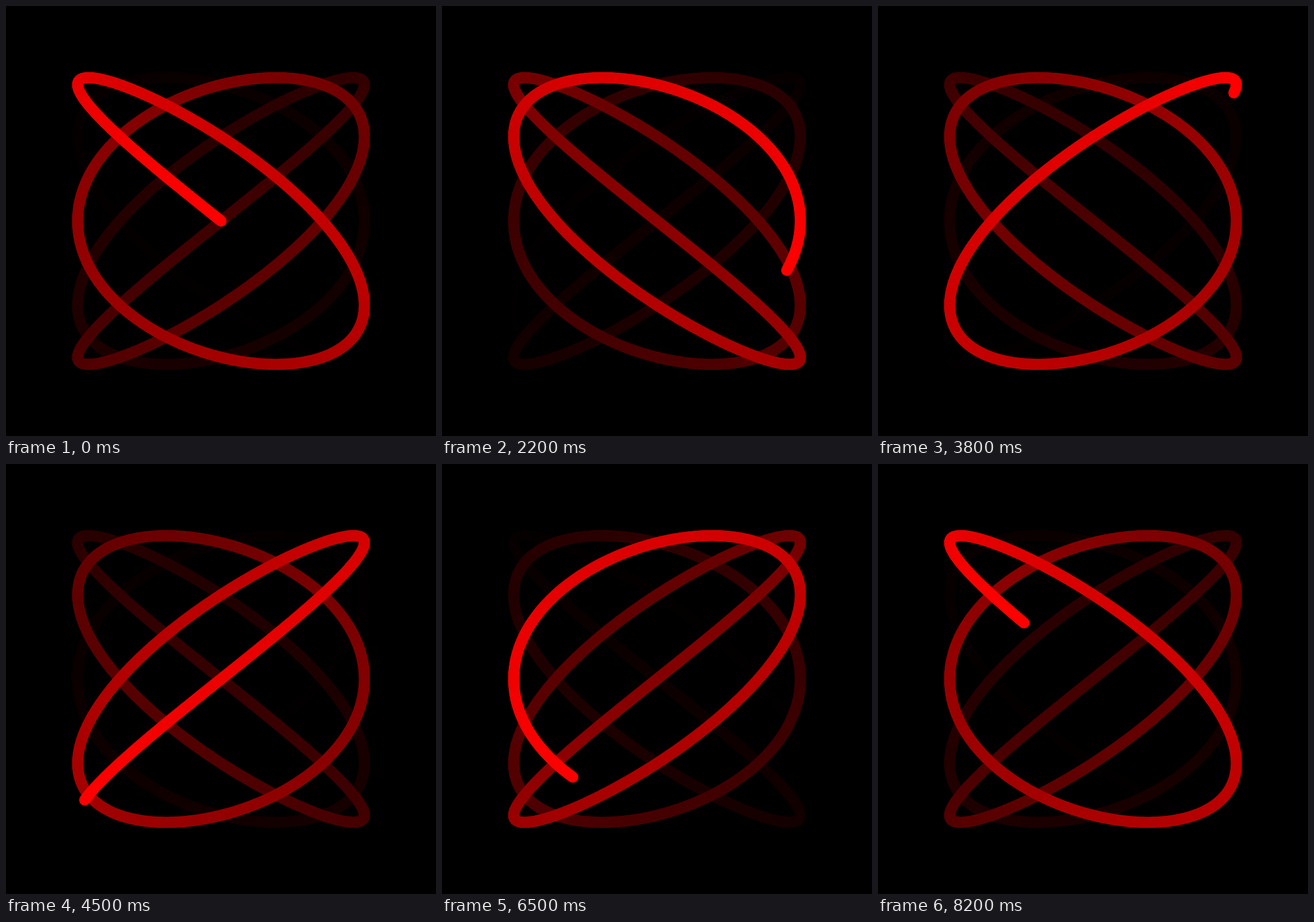
Recreate the animation shown at these times as an HTML page with a canvas. Size 748 by 748 pixels, loop 8300 ms.

```html
<!DOCTYPE html>
<html lang="en">
<head>
<meta charset="utf-8">
<title>Lissajous trail</title>
<style>
  html, body { margin: 0; height: 100%; overflow: hidden; background: #000; }
  canvas { display: block; width: 100vw; height: 100vh; }
</style>
</head>
<body>
<canvas id="stage" width="748" height="748"></canvas>
<script>
const ctx = document.getElementById('stage').getContext('2d');
const SIZE = 748, CENTER = SIZE / 2, AMPLITUDE = SIZE / 3;
const LOOP = 8300, STEP = 100;
const TURN = 2 * Math.PI;
const HEAD_STEP = TURN * 12 / 1000; // curve angle gained per step
const SEGMENTS = 2000;              // trail covers one whole period

ctx.lineWidth = 19.3;
ctx.lineCap = 'round';

const point = a => [
  CENTER + AMPLITUDE * Math.sin(5 * a),
  CENTER + AMPLITUDE * Math.sin(4 * a)
];

function draw(step) {
  const head = step * HEAD_STEP;
  ctx.fillStyle = '#000';
  ctx.fillRect(0, 0, SIZE, SIZE);
  let from = point(head - TURN);
  for (let i = 1; i <= SEGMENTS; i++) {
    const life = i / SEGMENTS;
    const to = point(head - TURN * (1 - life));
    ctx.strokeStyle = `rgb(${Math.round(255 * life * life)}, 0, 0)`;
    ctx.beginPath();
    ctx.moveTo(...from);
    ctx.lineTo(...to);
    ctx.stroke();
    from = to;
  }
}

let shown = -1;
function tick() {
  const step = Math.floor(performance.now() % LOOP / STEP);
  if (step !== shown) draw(shown = step);
  requestAnimationFrame(tick);
}
tick();
</script>
</body>
</html>
```
